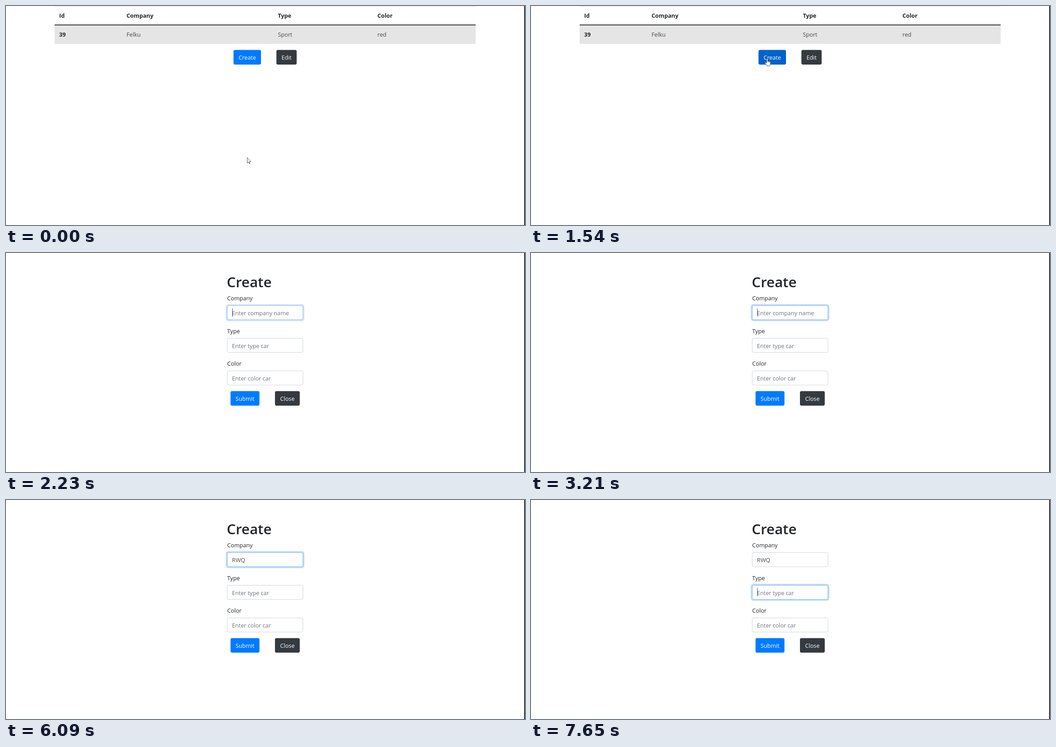
Animation of 1152x486 px, one loop 8 s. Source, as an HTML page with a canvas:

```html
<!DOCTYPE html>
<html lang="en">
<head>
<meta charset="utf-8">
<title>Car table</title>
<style>
html, body { margin: 0; width: 100%; height: 100%; overflow: hidden; background: #fff; }
canvas { display: block; }
</style>
</head>
<body>
<canvas id="stage" width="1152" height="486"></canvas>
<script>
const ctx = document.getElementById('stage').getContext('2d');
const LOOP = 8000, FORM_OPENS = 1640;
const FAMILY = '"Open Sans", "Noto Sans", sans-serif';
const TEXT = 12.7;
const INK = '#212529', BLUE = '#007bff', DARK = '#343a40';

// Tracks are [start, value...] entries, each held until the next one.
const CURSOR = [
  [0, 535, 336, 'arrow'], [290, 600, 318, 'arrow'], [385, 730, 262, 'arrow'],
  [480, 850, 204, 'arrow'], [575, 909, 182, 'arrow'], [670, 917, 186, 'arrow'],
  [960, 850, 180, 'arrow'], [1055, 660, 162, 'arrow'], [1150, 545, 152, 'arrow'],
  [1350, 524, 117, 'hand'], [1750, 526, 116, 'arrow'], [1930, 0, 0, 'none'],
  [6280, 560, 161, 'arrow'], [6380, 0, 0, 'none'],
  [6470, 560, 231, 'arrow'], [6570, 0, 0, 'none']
];
const CREATE_COLOR = [[0, BLUE], [1350, '#0072ee'], [1450, '#0069d9'], [1540, '#0062cc']];
const COMPANY_FOCUS = [[0, 0], [2130, 0.25], [2230, 0.75], [2320, 1], [6660, 0.4], [6760, 0]];
const TYPE_FOCUS = [[0, 0], [6660, 0.6], [6760, 1]];
const COMPANY_VALUE = [[0, ''], [3500, 'R'], [4300, 'RW'], [5590, 'RWQ']];
const COMPANY_CARET = [[0, 0], [2130, 1], [2610, 0], [3210, 1], [4000, 0], [4300, 1],
  [4800, 0], [5300, 1], [6090, 0]];
const TYPE_CARET = [[0, 0], [6660, 1], [7150, 0], [7650, 1]];

const entryAt = (track, t) => track.findLast(entry => entry[0] <= t);
const valueAt = (track, t) => entryAt(track, t)[1];

function rect(x, y, w, h, color) {
  ctx.fillStyle = color;
  ctx.fillRect(x, y, w, h);
}

function roundRect(x, y, w, h, r) {
  ctx.beginPath();
  ctx.roundRect(x, y, w, h, r);
}

function text(str, x, y, color = INK, weight = 400, size = TEXT) {
  ctx.font = `${weight} ${size}px ${FAMILY}`;
  ctx.fillStyle = color;
  ctx.fillText(str, x, y);
}

function button(label, x, y, w, color, border = color) {
  roundRect(x, y, w, 32.3, 3.4);
  ctx.fillStyle = border;
  ctx.fill();
  roundRect(x + 0.85, y + 0.85, w - 1.7, 30.6, 2.6);
  ctx.fillStyle = color;
  ctx.fill();
  ctx.textAlign = 'center';
  text(label, x + w / 2, y + 21.5, '#fff');
  ctx.textAlign = 'left';
}

function field(label, hint, y, focus = 0, value = '', caret = 0) {
  const x = 490.6, w = 169, h = 32.4;
  text(label, 491, y - 11.2);
  if (focus) {
    roundRect(x - 2.7, y - 2.7, w + 5.4, h + 5.4, 6);
    ctx.fillStyle = `rgba(0, 123, 255, ${0.25 * focus})`;
    ctx.fill();
  }
  roundRect(x + 0.5, y + 0.5, w - 1, h - 1, 3);
  ctx.fillStyle = '#fff';
  ctx.fill();
  ctx.lineWidth = 1;
  ctx.strokeStyle = '#ced4da';
  ctx.stroke();
  ctx.strokeStyle = `rgba(128, 189, 255, ${focus})`;
  ctx.stroke();
  text(value || hint, 501.6, y + 21.8, value ? '#495057' : '#6c757d');
  if (caret) {
    const advance = value ? ctx.measureText(value).width : 0;
    rect(Math.round(502 + advance), Math.floor(y + 7), 1, 18.5, '#495057');
  }
}

function drawTable(t) {
  rect(108, 0, 934.5, 1, '#dee2e6');
  rect(108, 43, 934.5, 41, '#e5e5e5');
  rect(108, 41.2, 934.5, 1.8, INK);
  const columns = [[118, 'Id', '39'], [267.5, 'Company', 'Felku'],
    [603.5, 'Type', 'Sport'], [824.5, 'Color', 'red']];
  columns.forEach(([x, head, cell], i) => {
    text(head, x, 26, INK, 700);
    text(cell, x, 68.2, i ? '#45484b' : INK, i ? 400 : 700);
  });
  button('Create', 505, 97.6, 61, valueAt(CREATE_COLOR, t), t < 1350 ? BLUE : '#005fc8');
  button('Edit', 600.2, 97.6, 45, DARK);
}

function drawForm(t) {
  text('Create', 490, 76, INK, 600, 31.4);
  field('Company', 'Enter company name', 116.2, valueAt(COMPANY_FOCUS, t),
    valueAt(COMPANY_VALUE, t), valueAt(COMPANY_CARET, t));
  field('Type', 'Enter type car', 188.7, valueAt(TYPE_FOCUS, t), '', valueAt(TYPE_CARET, t));
  field('Color', 'Enter color car', 261.2);
  button('Submit', 498.4, 306.4, 64.2, BLUE);
  button('Close', 597, 306.4, 55, DARK);
}

const arrowShape = new Path2D('M.5 .5V12.6L3.2 10.1L5 14.2L6.7 13.4L5 9.5H8.7Z');
const handShape = new Path2D('M-1 9V1.5Q-1 .3 .3 .3T1.6 1.5V5.2Q3 4.4 3.9 5.7' +
  'Q5.3 5 6 6.4Q7.6 6 7.7 7.8V11Q7.6 13 6.4 14.2V16H-.4V14.6' +
  'L-4.9 9.6Q-5.4 8.3-4.2 7.9Q-3 7.7-1 9.8Z');
const handCreases = new Path2D('M1.6 5V8M3.9 5.7V8.2M6 6.4V8.6');

function drawCursor([, x, y, kind]) {
  if (kind === 'none') return;
  const shape = kind === 'hand' ? handShape : arrowShape;
  ctx.save();
  ctx.translate(x, y);
  ctx.lineWidth = 0.85;
  ctx.lineJoin = 'round';
  ctx.fillStyle = '#fff';
  ctx.strokeStyle = '#30343c';
  ctx.fill(shape);
  ctx.stroke(shape);
  if (kind === 'hand') ctx.stroke(handCreases);
  ctx.restore();
}

function draw(now) {
  const t = now % LOOP;
  rect(0, 0, 1152, 486, '#fff');
  if (t < FORM_OPENS) drawTable(t);
  else drawForm(t);
  rect(1150.4, 0, 1.6, 486, '#000');
  drawCursor(entryAt(CURSOR, t));
}

const start = performance.now();
function tick() {
  draw(performance.now() - start);
  requestAnimationFrame(tick);
}
tick();
</script>
</body>
</html>
```
